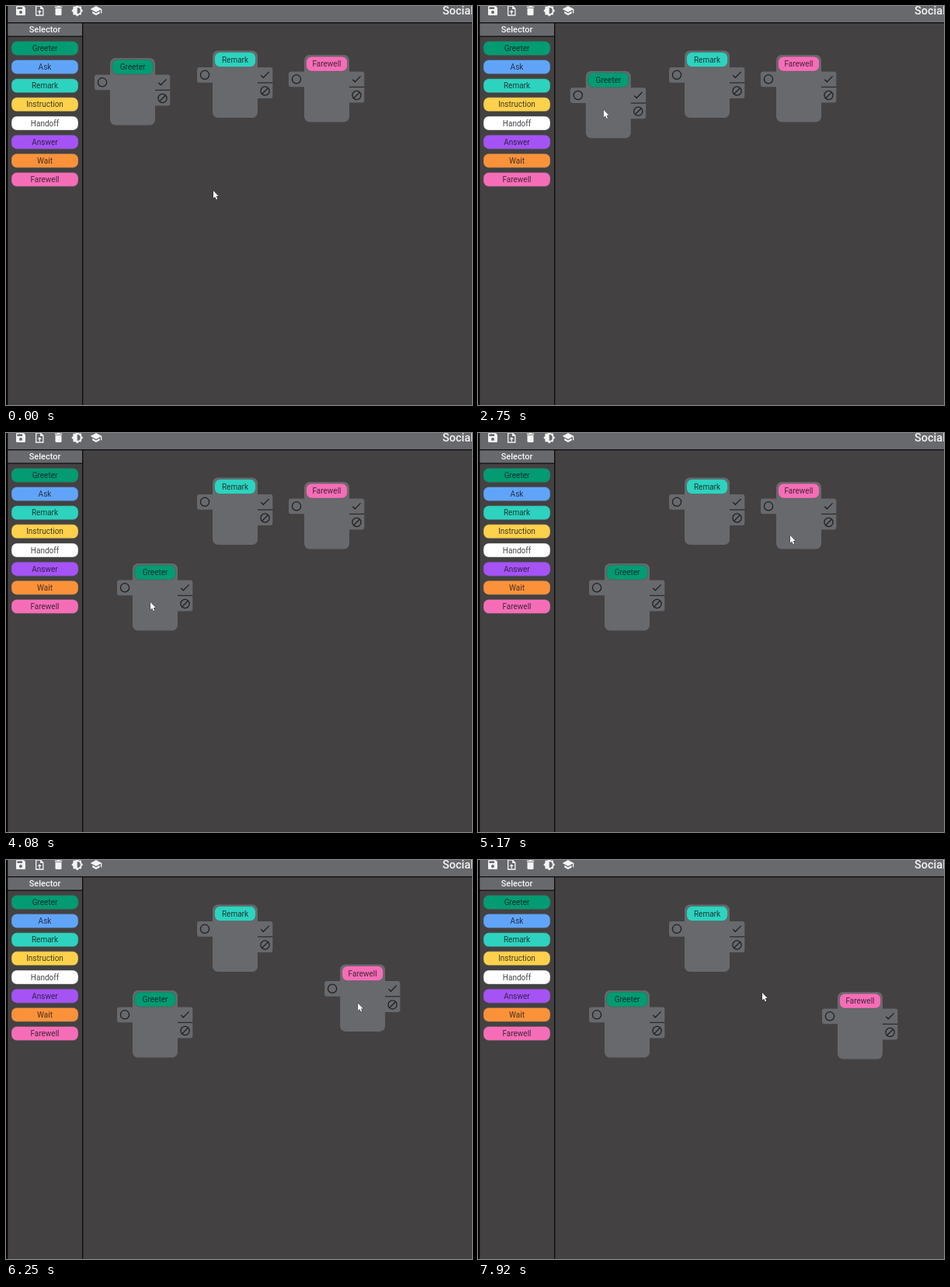
These frames come from a looping animation (600 px wide and 514 px high, 8000 ms). An HTML page with a canvas:

```html
<!DOCTYPE html>
<html lang="en">
<head>
<meta charset="utf-8">
<title>Flow editor</title>
<style>
  html, body { margin: 0; width: 100%; height: 100%; overflow: hidden; background: #434142; }
  canvas { display: block; width: 600px; height: 514px; }
</style>
</head>
<body>
<canvas id="stage" width="600" height="514"></canvas>
<script>
const ctx = document.getElementById('stage').getContext('2d');
const LOOP = 8000, FPS = 12;
const BACK = '#434142', PANEL = '#68696d', LINE = '#0c0c0c', LIGHT = '#f4f4f4';
const INK = '#202022', LABEL = 'rgba(22,20,26,.8)', EDGE = 'rgba(80,80,84,.45)';

const COLORS = {
  Greeter: '#029b72', Ask: '#60a4fa', Remark: '#2dd3be', Instruction: '#fdd14b',
  Handoff: '#ffffff', Answer: '#a653f6', Wait: '#fb923a', Farewell: '#f56db7'
};

// ---- drawing helpers ----

function rect(x, y, w, h, color) {
  ctx.fillStyle = color;
  ctx.fillRect(x, y, w, h);
}

function rounded(x, y, w, h, r, color) {
  ctx.fillStyle = color;
  ctx.beginPath();
  ctx.roundRect(x, y, w, h, r);
  ctx.fill();
}

function trace(...points) {
  ctx.beginPath();
  for (let i = 0; i < points.length; i += 2) ctx.lineTo(points[i], points[i + 1]);
}

function poly(color, ...points) {
  trace(...points);
  ctx.fillStyle = color;
  ctx.fill();
}

function disc(x, y, r, color, from = 0, to = Math.PI * 2) {
  ctx.beginPath();
  ctx.arc(x, y, r, from, to);
  ctx.fillStyle = color;
  ctx.fill();
}

function ring(x, y) {
  ctx.beginPath();
  ctx.arc(x, y, 5.6, 0, Math.PI * 2);
  ctx.stroke();
}

function placed(x, y, draw) {
  ctx.save();
  ctx.translate(x, y);
  draw();
  ctx.restore();
}

function text(str, x, y, font, color, align = 'center') {
  ctx.font = font + ' Roboto, sans-serif';
  ctx.fillStyle = color;
  ctx.textAlign = align;
  ctx.fillText(str, x, y);
}

function pill(name, x, y, w, h) {
  rounded(x - w / 2, y - h / 2, w, h, 7, COLORS[name]);
  ctx.strokeStyle = EDGE;
  ctx.lineWidth = 1;
  ctx.stroke();
  text(name, x, y + 3.5, '10px', LABEL);
}

// ---- toolbar icons, centred on 0,0 ----

function saveIcon() {
  rounded(-6, -6, 12, 12, [1.3, 4, 1.3, 1.3], LIGHT);
  rect(-4.6, -4.6, 6.6, 2.6, PANEL);
  disc(0, 2, 2, PANEL);
}

function uploadIcon() {
  trace(-4.6, -6, 1.2, -6, 4.6, -2.4, 4.6, 6, -4.6, 6);
  ctx.closePath();
  ctx.strokeStyle = LIGHT;
  ctx.lineWidth = 1.3;
  ctx.stroke();
  poly(LIGHT, 0.8, -6, 0.8, -2, 4.6, -2);
  poly(LIGHT, -2.7, 2, 0, -0.7, 2.7, 2);
  rect(-0.7, 1, 1.4, 3.6, LIGHT);
}

function trashIcon() {
  rounded(-4, -3.3, 8, 9.3, [0, 0, 1.3, 1.3], LIGHT);
  rect(-4.7, -5.3, 9.4, 1.3, LIGHT);
  rect(-1.7, -6, 3.4, 1, LIGHT);
}

function brightnessIcon() {
  for (let i = 0; i < 2; i++) {
    rect(-5.3, -5.3, 10.6, 10.6, LIGHT);
    ctx.rotate(Math.PI / 4);
  }
  ctx.rotate(-Math.PI / 2);
  disc(0, 0, 4, PANEL, -Math.PI / 2, Math.PI / 2);
}

function schoolIcon() {
  poly(LIGHT, -7.3, -2, 0, -6, 7.3, -2, 0, 2);
  poly(LIGHT, -4.7, 0.8, 0, 3.4, 4.7, 0.8, 4.7, 3.4, 0, 6, -4.7, 3.4);
  rect(6, -2, 1.3, 5.3, LIGHT);
}

// ---- scene ----

function drawFrame() {
  rect(0, 0, 600, 514, BACK);
  rect(0, 0, 600, 21, PANEL);
  rect(2, 22, 96, 17, PANEL);
  rect(0, 21, 600, 1.3, LINE);
  rect(0, 38.5, 98, 1.2, LINE);
  rect(0, 0, 2.3, 514, '#000');
  rect(98, 21, 1.3, 514, LINE);

  [saveIcon, uploadIcon, trashIcon, brightnessIcon, schoolIcon]
    .forEach((icon, i) => placed(19 + i * 24.25, 6, icon));
  text('Social', 562, 11, '500 14.5px', LIGHT, 'left');
  text('Selector', 50, 34, '500 11px', LIGHT);
  Object.keys(COLORS).forEach((name, i) => pill(name, 50, 54.4 + i * 24.15, 86, 18));
}

function drawNode(name, [x, y]) {
  placed(x, y, () => {
    rounded(-20, 21.5, 22, 19.8, [3, 0, 0, 3], PANEL);
    rounded(56, 21.5, 21.3, 40, [0, 3, 3, 0], PANEL);
    rounded(0, 0, 58, 86.5, 7, PANEL);
    pill(name, 29, 11.6, 53, 19);
    rect(58, 40.8, 19.3, 1.2, '#29292b');

    ctx.strokeStyle = INK;
    ctx.lineWidth = 1.3;
    ring(-10, 31.3);
    ring(67.5, 52);
    trace(63.5, 56, 71.5, 48);
    ctx.stroke();
    trace(62.3, 31.7, 65.3, 34.8, 72.6, 27.4);
    ctx.stroke();
  });
}

function drawCursor([x, y]) {
  placed(x, y, () => {
    trace(0, 0, 0, 9.6, 2.2, 7.7, 3.8, 11.2, 5.2, 10.6, 3.8, 7.1, 6.7, 7.1);
    ctx.closePath();
    ctx.strokeStyle = 'rgba(20,20,20,.6)';
    ctx.lineWidth = 1;
    ctx.stroke();
    ctx.fillStyle = '#fff';
    ctx.fill();
  });
}

// ---- motion ----

// Eased move; bend > 1 makes x lag behind y.
function glide(t, begin, end, [x0, y0], [x1, y1], bend = 1) {
  const u = Math.min(1, Math.max(0, (t - begin) / (end - begin)));
  const p = u * u * (3 - 2 * u);
  return [x0 + (x1 - x0) * p ** bend, y0 + (y1 - y0) * p];
}

const greeterAt = t => glide(t, 2420, 3700, [134, 67], [163, 168]);
const farewellAt = t => glide(t, 5440, 6760, [384, 63], [463, 170], 1.33);
const held = ([x, y]) => [x + 23, y + 50];

function cursorAt(t) {
  if (t < 460) return glide(t, 0, 420, [267, 238], [159, 150]);
  if (t < 900) return glide(t, 500, 830, [159, 150], [151, 139]);
  if (t < 1480) return glide(t, 920, 1420, [151, 139], [153.5, 119]);
  if (t < 2420) return glide(t, 1500, 2080, [153.5, 119], held(greeterAt(0)));
  if (t < 4080) return held(greeterAt(t));
  if (t < 4920) return glide(t, 4080, 4920, held(greeterAt(t)), [379, 170]);
  if (t < 5170) return glide(t, 4920, 5160, [379, 170], [402, 132]);
  if (t < 5440) return glide(t, 5170, 5420, [402, 132], held(farewellAt(0)));
  if (t < 7420) return held(farewellAt(t));
  return glide(t, 7420, 7900, held(farewellAt(t)), [366, 171]);
}

function render(now) {
  // The small lead absorbs rounding of the step length to 10 ms.
  const t = Math.floor((now + 3.4) % LOOP * FPS / 1000) * 1000 / FPS;
  drawFrame();
  drawNode('Remark', [266, 57.5]);
  drawNode('Greeter', greeterAt(t));
  drawNode('Farewell', farewellAt(t));
  drawCursor(cursorAt(t));
}

const start = performance.now();
function tick() {
  render(performance.now() - start);
  requestAnimationFrame(tick);
}
tick();
</script>
</body>
</html>
```
